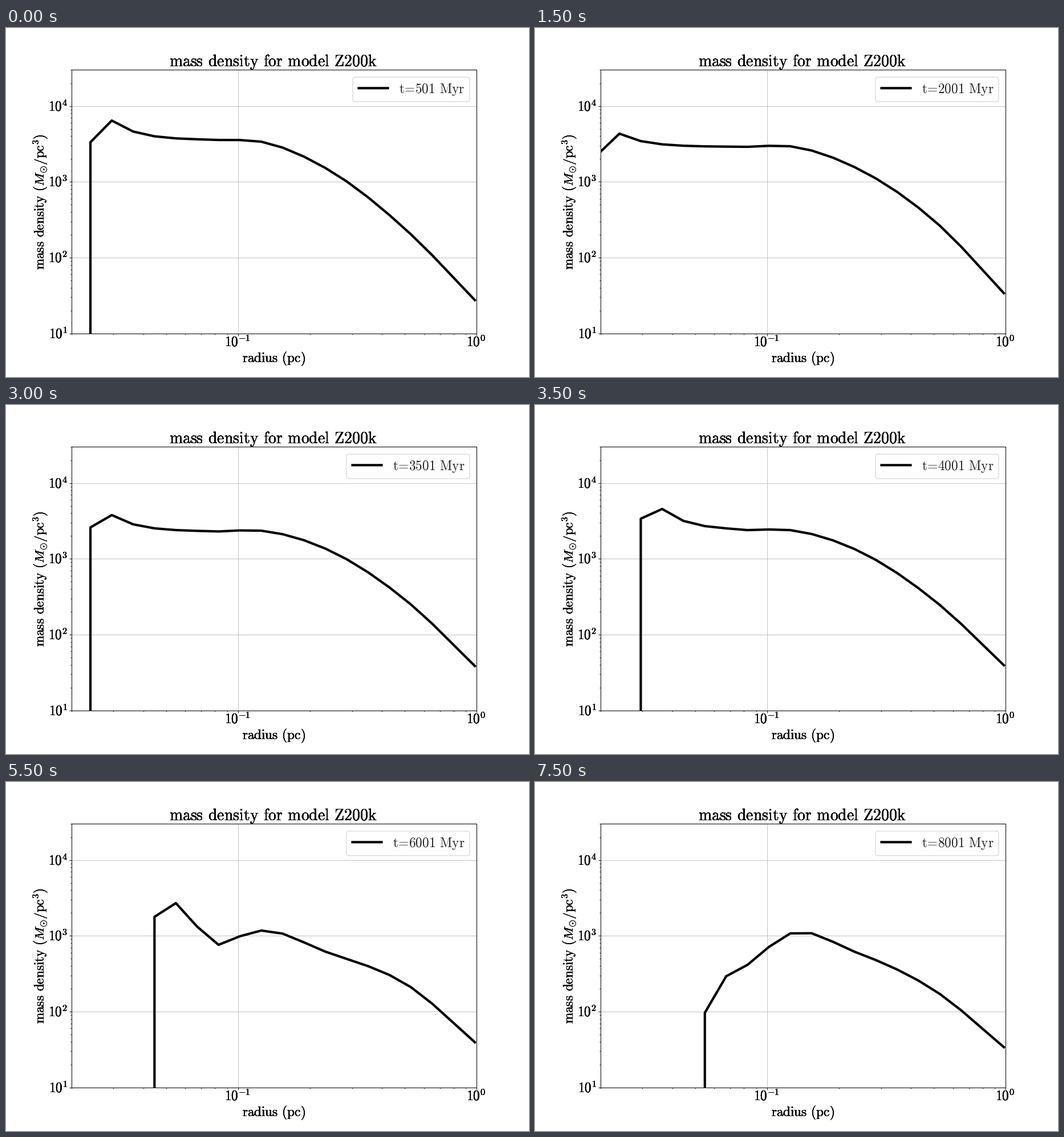
A matplotlib script for the animation above (8000 ms loop, 917 by 611 pixels).

```python
import matplotlib.pyplot as plt
import numpy as np
from matplotlib.animation import FuncAnimation
from matplotlib.patches import FancyBboxPatch
from matplotlib.ticker import LogLocator, NullFormatter

W, H, DPI = 917, 611, 64
PT = 72 / DPI                      # points per pixel
FRAMES, STEP = 16, 500
FLOOR, DECADE = 534.6, 132.67      # row of 10^1 and rows per decade
LAST = 18                          # outermost bin
SPACE = r"\:\,"

plt.rcParams["mathtext.fontset"] = "cm"

# Key shapes: step, drop of the first bin, row of the peak, rows at KNOTS.
KNOTS = np.array([6, 8, 11, 15, LAST])
SHAPES = np.array([
    [0, 38, 162, 196, 199, 245, 361],
    [1, 45, 127, 172, 177, 230, 344],
    [4, 31, 214, 226, 222, 250, 347],
    [7, 17, 182, 219, 219, 252, 350],
    [9, 38, 202, 237, 255, 251, 350],
    [11, 24, 212, 285, 260, 297, 359],
    [15, 64, 340, 320, 265, 297, 371],
])
# Innermost filled bin at each step.
INNER = [0, 0, -1, -1, 2, 0, 0, 1, 1, 2, 0, 3, 0, 3, 4, 4]


def hermite(x, xs, ys):
    """Smooth curve through the points (xs, ys)."""
    m = np.gradient(ys, xs)
    k = np.clip(np.searchsorted(xs, x, side="right") - 1, 0, len(xs) - 2)
    h = xs[k + 1] - xs[k]
    u = (x - xs[k]) / h
    return ((1 + 2 * u) * (1 - u) ** 2 * ys[k] + u * (1 - u) ** 2 * h * m[k]
            + u * u * (3 - 2 * u) * ys[k + 1] + u * u * (u - 1) * h * m[k + 1])


def profile(n):
    """Radius and density: a cusp that relaxes into a smooth outer decline."""
    drop, peak, *rows = [np.interp(n, SHAPES[:, 0], col)
                         for col in SHAPES[:, 1:].T]
    end = 454.5 + 0.27 * (n - 9) ** 2
    start = INNER[n]
    bins = np.arange(start, LAST + 1)
    outer = hermite(bins, KNOTS, np.array(rows + [end]))
    cusp = rows[0] + (peak - rows[0]) * np.exp(-(bins - start - 1) / 1.2)
    y = np.where(bins < KNOTS[0], cusp, outer)
    y[0] = peak + drop
    r = 10 ** ((148 + 37.45 * bins - 825.3) / 418.3)
    rho = 10 ** (1 + (FLOOR - y) / DECADE)
    return np.r_[r[0], r], np.r_[1e-3, rho]


def roman(text):
    return r"\mathrm{" + text.replace(" ", SPACE) + "}"


fig = plt.figure(figsize=(W / DPI, H / DPI), dpi=DPI, facecolor="white")

ax = fig.add_axes([0.125, 0.125, 0.775, 0.755])
ax.set(xscale="log", yscale="log", xlim=(0.02, 1), ylim=(10, 3e4))
for axis in (ax.xaxis, ax.yaxis):
    axis.set_major_locator(LogLocator(10))
    axis.set_minor_locator(LogLocator(10, subs=np.arange(2, 10)))
    axis.set_major_formatter(NullFormatter())
    axis.set_minor_formatter(NullFormatter())
ax.tick_params(which="major", length=3.7 * PT, width=0.9 * PT)
ax.tick_params(which="minor", length=2.1 * PT, width=0.8 * PT)
ax.grid(color="#b8b8b8", linewidth=0.85 * PT)
for spine in ax.spines.values():
    spine.set_linewidth(PT)
curve, = ax.plot([], [], color="black", linewidth=4.2 * PT)

# Overlay in pixel coordinates, origin at the top left.
stage = fig.add_axes([0, 0, 1, 1], zorder=2)
stage.set(xlim=(0, W), ylim=(H, 0))
stage.axis("off")


def label(x, y, text, size=23.2, ha="center", **kw):
    # Overprinting hardens the soft edges of the letters.
    for _ in range(5):
        stage.text(x, y, f"${text}$", fontsize=size * PT, ha=ha,
                   va="baseline", color="black", **kw)


label(468, 67, roman("mass density for model Z200k"), 27.8)
label(469.5, 585, roman("radius (pc)"))
label(68.5, 304, roman("mass density (") + r"M_{\odot}" + roman("/pc^3)"),
      rotation=90, rotation_mode="anchor")
for p in range(1, 5):
    row = FLOOR - DECADE * (p - 1)
    label(108, row + 8.5, roman(f"10^{p}"), ha="right")
label(406, 558, roman("10^{-1}"))
label(823.5, 558, roman("10^0"))

box = FancyBboxPatch((608, 86), 205, 43, facecolor="white", edgecolor="0.8",
                     boxstyle="round,pad=0,rounding_size=5", linewidth=PT)
stage.add_patch(box)
key, = stage.plot([], [], color="black", linewidth=4.2 * PT, snap=False)
caption = stage.text(689, 114, "", fontsize=23.2 * PT, va="baseline",
                     color="0.12")


def update(n):
    myr = STEP * (n + 1) + 1
    left = 608 if myr < 1000 else 597
    curve.set_data(*profile(n))
    box.set_bounds(left, 86, 813 - left, 43)
    key.set_data([left + 10.5, left + 61.5], [105.3, 105.3])
    caption.set_x(left + 81)
    caption.set_text("$" + roman(rf"t\!=\!{myr} Myr") + "$")
    return curve, box, key, caption


anim = FuncAnimation(fig, update, frames=FRAMES, interval=STEP, repeat=True)
plt.show()
```
